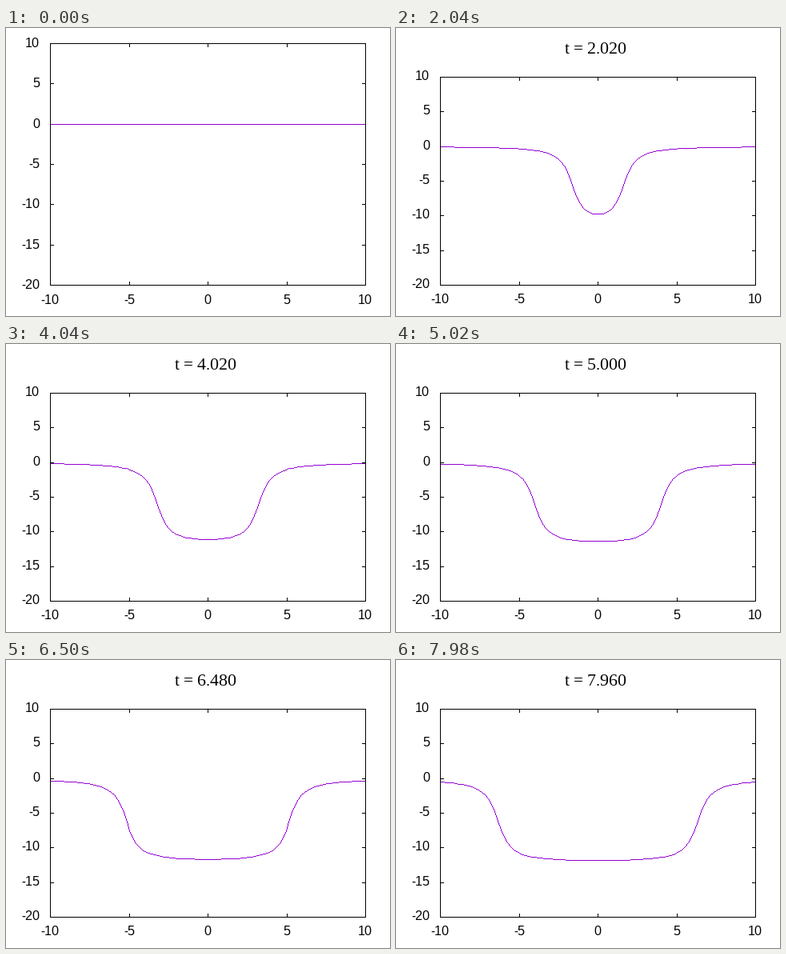
A matplotlib script that plays this animation: 480 px wide and 360 px high, repeating every 8000 ms.

```python
import numpy as np
import matplotlib.pyplot as plt
from matplotlib.animation import FuncAnimation

plt.rcParams["text.hinting"] = "default"
plt.rcParams["text.hinting_factor"] = 1

W, H, DPI = 480, 360, 100
FRAMES, STEP = 400, 20
LEFT, RIGHT, BOTTOM = 55, 449, 321
TICK = 4
SPEED, SPREAD, DEPTH = 0.8, 0.59, 4.0
PURPLE, BLACK = (148, 0, 211), (0, 0, 0)
X_TICKS = range(-10, 11, 5)
Y_TICKS = range(-20, 11, 5)
GRID = np.linspace(-10, 10, 100)


def snap(v):
    return np.floor(np.asarray(v) + 0.5).astype(int)


def px(x):
    return snap(LEFT + (x + 10) / 20 * (RIGHT - LEFT))


def py(y, top):
    return snap(BOTTOM - (y + 20) / 30 * (BOTTOM - top))


def segment(canvas, x0, y0, x1, y1, color):
    n = max(abs(x1 - x0), abs(y1 - y0)) + 1
    canvas[snap(np.linspace(y0, y1, n)), snap(np.linspace(x0, x1, n))] = color


def wave(t):
    """Two kinks running apart: a string struck at the middle."""
    shift = SPEED * t
    return -DEPTH * (np.arctan((GRID + shift) / SPREAD)
                     - np.arctan((GRID - shift) / SPREAD))


def paint(t, top):
    canvas = np.full((H, W, 3), 255, np.uint8)
    for v in X_TICKS:
        x = px(v)
        segment(canvas, x, BOTTOM, x, BOTTOM - TICK, BLACK)
        segment(canvas, x, top, x, top + TICK, BLACK)
    for v in Y_TICKS:
        y = py(v, top)
        segment(canvas, LEFT, y, LEFT + TICK, y, BLACK)
        segment(canvas, RIGHT, y, RIGHT - TICK, y, BLACK)
    xs, ys = px(GRID), py(wave(t), top)
    for i in range(len(xs) - 1):
        segment(canvas, xs[i], ys[i], xs[i + 1], ys[i + 1], PURPLE)
    for y in (top, BOTTOM):
        segment(canvas, LEFT, y, RIGHT, y, BLACK)
    for x in (LEFT, RIGHT):
        segment(canvas, x, top, x, BOTTOM, BLACK)
    return canvas


fig = plt.figure(figsize=(W / DPI, H / DPI), dpi=DPI, facecolor="white")
ax = fig.add_axes([0, 0, 1, 1])
ax.axis("off")
image = ax.imshow(paint(0, 19), extent=(0, W, H, 0), aspect="auto",
                  interpolation="nearest")
ax.set_xlim(0, W)
ax.set_ylim(H, 0)


def label(x, text, align, size=16, font="Liberation Sans"):
    return ax.text(x, 0, text, ha=align, va="baseline", family=font,
                   fontsize=size * 72 / DPI, color="black")


x_labels = [label(px(v), str(v), "center") for v in X_TICKS]
y_labels = [label(42, str(v), "right") for v in Y_TICKS]
title = label(211, "", "left", 64 / 3, "Liberation Serif")
title.set_y(32)


def update(i):
    # The opening frame has no title, so its plot box is taller.
    top, drop = (19, 5) if i == 0 else (61, 4)
    t = max(i - 1, 0) * STEP / 1000
    image.set_data(paint(t, top))
    for text in x_labels:
        text.set_y(340 + drop)
    for text, v in zip(y_labels, Y_TICKS):
        text.set_y(py(v, top) + drop)
    title.set_text(f"t = {t:.3f}" if i else "")
    return [image, title, *x_labels, *y_labels]


anim = FuncAnimation(fig, update, frames=FRAMES, interval=STEP,
                     repeat=True, repeat_delay=0, blit=False)
plt.show()
```
